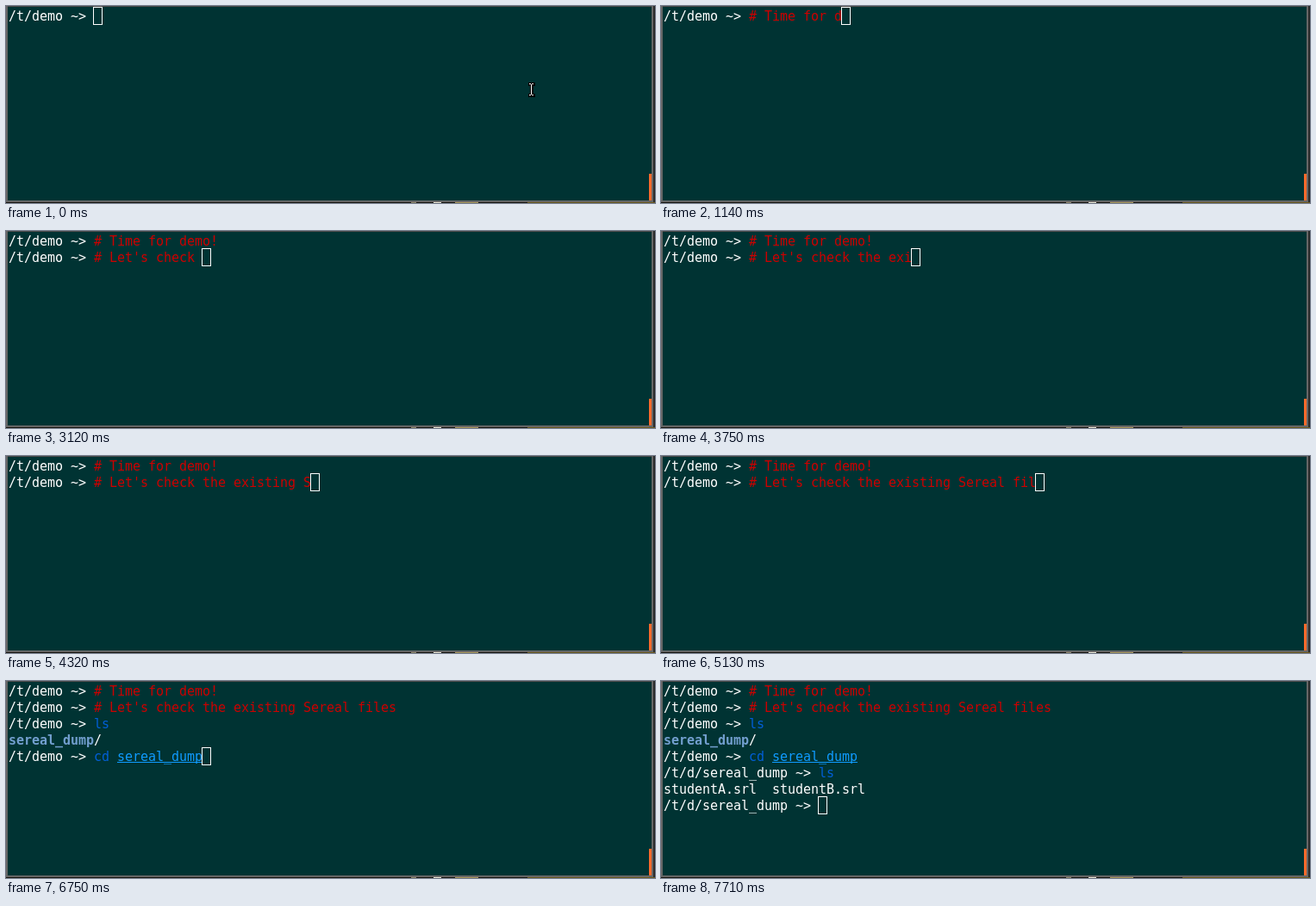
Animation of 753 by 229 pixels, one loop 8000 ms. Source, as an HTML page with a canvas:

```html
<!DOCTYPE html>
<html lang="en">
<head>
<meta charset="utf-8">
<title>Terminal demo</title>
<style>
html, body { margin: 0; width: 100%; height: 100%; overflow: hidden; background: #003333; }
canvas { display: block; }
</style>
</head>
<body>
<canvas id="stage" width="753" height="229"></canvas>
<script>
const ctx = document.getElementById('stage').getContext('2d');
const LOOP = 8000, CELL = 9, ROW = 19;
const WHITE = '#ffffff', RED = '#cc0000', BLUE = '#005fd7', PATH = '#0f9bff',
      DIR = '#729fcf', HINT = '#7a1c1c';

// Bursts of typing: first key, last key, keys
const bursts = [
  [240, 900, '# Time for '], [1140, 1290, 'demo'], [1470, 1470, '!'], [1920, 1920, '\n'],
  [2100, 2100, '#'], [2250, 3030, " Let's check"], [3120, 3120, ' '], [3330, 3810, 'the exis'],
  [3960, 4320, 'ting S'], [4440, 4650, 'erea'], [4800, 5520, 'l files\nls\n'],
  [5730, 5790, 'cd '], [5880, 6210, 'sereal'], [6390, 6750, '_dump'], [6990, 6990, '\n'],
  [7530, 7710, 'ls\n']
];
const keys = bursts.flatMap(([from, to, text]) => [...text].map((ch, i) =>
  ({ ch, time: from + (to - from) * i / Math.max(1, text.length - 1) })));

// What each command prints, by its place in the session
const output = {
  2: [['sereal_dump', DIR, true], ['/', WHITE]],
  4: [['studentA.srl  studentB.srl', WHITE]]
};

function rect(color, x, y, w, h) {
  ctx.fillStyle = color;
  ctx.fillRect(x, y, w, h);
}

// Writes text on the character grid and returns the next column
function write(text, col, row, color, bold) {
  ctx.font = (bold ? 'bold ' : '') + '15px "DejaVu Sans Mono", monospace';
  ctx.fillStyle = color;
  for (const ch of text) ctx.fillText(ch, 3 + CELL * col++, 17 + ROW * row);
  return col;
}

function writeCommand(cmd, col, row) {
  if (cmd[0] === '#') return write(cmd, col, row, RED);
  const [name, arg] = cmd.split(' ');
  col = write(name, col, row, name.length < 2 ? RED : BLUE);
  if (arg === undefined) return col;
  const start = ++col;
  col = write(arg, col, row, PATH);
  rect(PATH, 3 + CELL * start, 94 + ROW * (row - 4), CELL * arg.length, 1);
  return col;
}

// Autosuggestion after the cursor
function writeHint(cmd, col, row) {
  if (cmd[0] !== 'c') return;
  const rest = (cmd.length > 3 ? 'cd sereal_dump' : 'cd ..').slice(cmd.length);
  write(rest.slice(0, 1), col, row, WHITE);
  write(rest.slice(1), col + 1, row, HINT);
}

function drawWindow() {
  rect('#003333', 0, 0, 753, 229);
  rect('#4a4a4a', 0, 0, 753, 1);
  rect('#666666', 0, 0, 2, 228);
  rect('#666666', 749, 0, 2, 228);
  rect('#2b2b2b', 751, 0, 2, 228);
  rect('#666666', 0, 226, 751, 2);
  rect('#ff6a2b', 746, 195, 3, 31);
  // sliver of wallpaper
  rect('#17150f', 0, 228, 753, 1);
  rect('#6b5a1e', 605, 228, 148, 1);
  rect('#8c8468', 470, 228, 6, 1);
  rect('#e8e4d4', 496, 228, 9, 1);
  rect('#a8965a', 521, 228, 27, 1);
}

function drawPointer() {
  rect('#000000', 606, 89, 8, 4);
  rect('#000000', 606, 102, 8, 4);
  rect('#000000', 608, 90, 4, 14);
  rect('#ffffff', 607, 90, 2, 1);
  rect('#ffffff', 610, 90, 2, 1);
  rect('#ffffff', 609, 91, 1, 12);
  rect('#ffffff', 607, 103, 2, 1);
  rect('#ffffff', 610, 103, 2, 1);
}

function draw(t) {
  drawWindow();
  if (t < 240) drawPointer();
  const commands = keys.filter(k => k.time <= t + 0.5).map(k => k.ch).join('').split('\n');
  const last = commands.length - 1;
  let row = 0;
  commands.forEach((cmd, i) => {
    let col = write(i < 4 ? '/t/demo ~> ' : '/t/d/sereal_dump ~> ', 0, row, WHITE);
    col = writeCommand(cmd, col, row);
    if (i === last) {
      writeHint(cmd, col, row);
      ctx.strokeStyle = WHITE;
      ctx.lineWidth = 1;
      ctx.strokeRect(2.5 + CELL * col, 1.5 + ROW * row, 10, 20);
      return;
    }
    row++;
    if (output[i]) {
      let c = 0;
      for (const [text, color, bold] of output[i]) c = write(text, c, row, color, bold);
      row++;
    }
  });
}

const start = performance.now();
function tick() {
  draw((performance.now() - start) % LOOP);
  requestAnimationFrame(tick);
}
tick();
</script>
</body>
</html>
```
